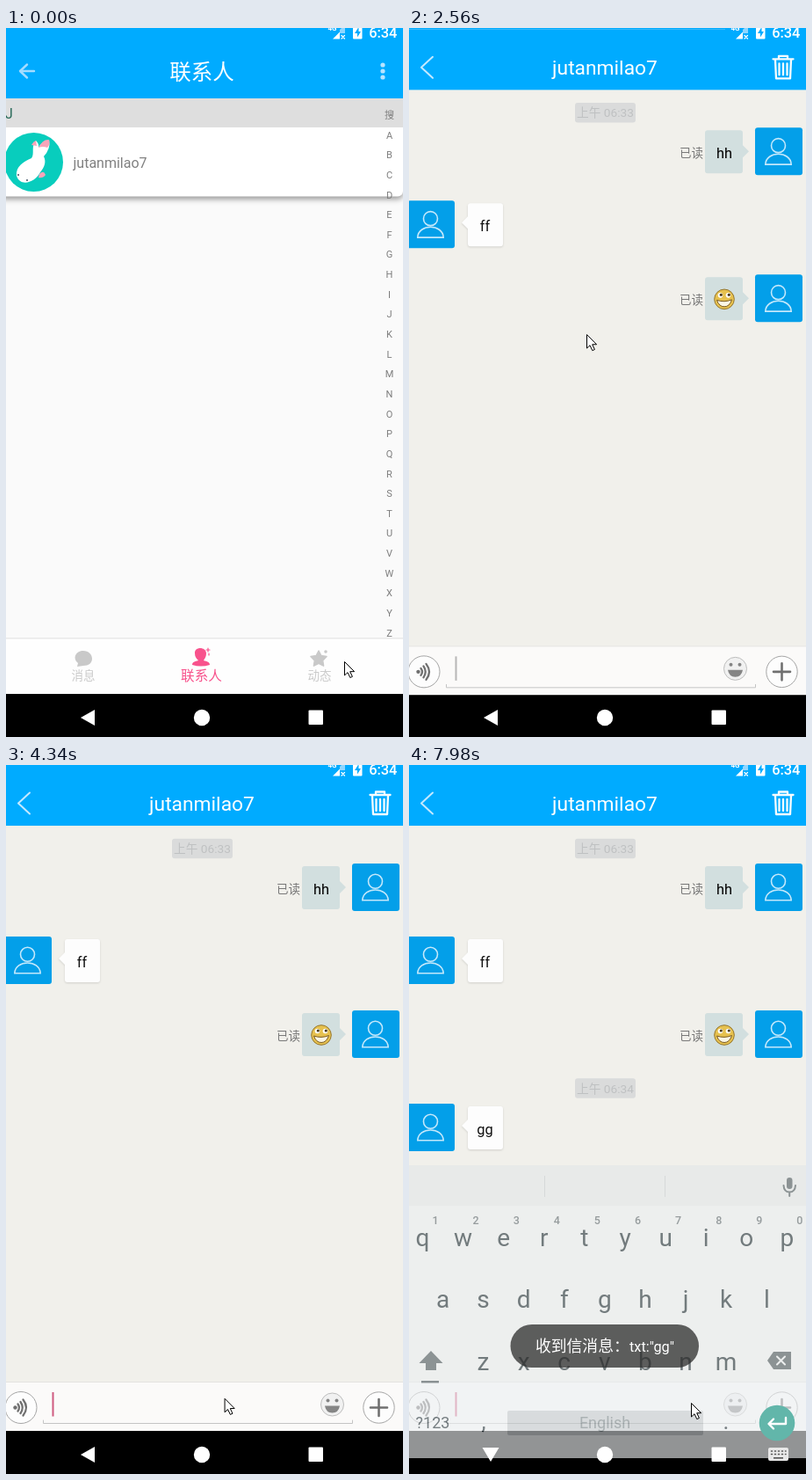
Write an HTML page that moves like this. It is 452 px wide and 806 px high and loops after 8 s.

```html
<!DOCTYPE html>
<html lang="zh">
<head>
<meta charset="utf-8">
<title>Chat demo</title>
<style>
  html, body { margin: 0; width: 100%; height: 100%; overflow: hidden; background: #000; }
  svg { display: block; font-family: Roboto, "Noto Sans CJK SC", "Noto Sans CJK", sans-serif; }
  .card { filter: drop-shadow(0 3px 3px #0006); }
  .bubble { filter: drop-shadow(0 1px 1px #0002); }
  .line { fill: none; stroke-linecap: round; stroke-linejoin: round; }
</style>
</head>
<body>
<svg id="stage" width="452" height="806" viewBox="0 0 452 806"></svg>
<script>
const NAME = 'jutanmilao7';
const BLUE = '#00abff';
const PINK = '#f8528c';

// Markup helpers
const rect = (x, y, w, h, fill, rx = 0, more = '') =>
  `<rect x="${x}" y="${y}" width="${w}" height="${h}" fill="${fill}" rx="${rx}" ${more}/>`;
const circle = (x, y, r, fill, more = '') =>
  `<circle cx="${x}" cy="${y}" r="${r}" fill="${fill}" ${more}/>`;
const shape = (d, fill, more = '') => `<path d="${d}" fill="${fill}" ${more}/>`;
const line = (d, stroke, width = 2, more = '') =>
  `<path class="line" d="${d}" stroke="${stroke}" stroke-width="${width}" ${more}/>`;
const text = (x, y, str, size, fill, anchor = 'middle', weight = 400) =>
  `<text x="${x}" y="${y}" font-size="${size}" fill="${fill}" text-anchor="${anchor}" font-weight="${weight}">${str}</text>`;
const group = (id, ...parts) => `<g id="${id}">${parts.join('')}</g>`;

function star(cx, cy, r) {
  const points = Array.from({ length: 10 }, (_, i) => {
    const a = i * Math.PI / 5 - Math.PI / 2, k = i % 2 ? r * 0.52 : r;
    return [cx + k * Math.cos(a), cy + k * Math.sin(a)];
  });
  return `<polygon points="${points}" fill="#c9c9c9" stroke="#c9c9c9" stroke-width="1.5" stroke-linejoin="round"/>`;
}

// Contacts page
const fish = circle(31.5, 152.5, 33.5, '#08cdbd')
  + shape('M12 168C11 157 20 152 29 148C33 143 28 135 34 128Q38 132 37 136Q42 127 49 128Q51 137 43 146C46 152 44 158 39 164C33 176 16 181 12 168Z', '#fff')
  + shape('M37 136Q42 126 49 127Q51 132 47 136Q42 134 37 136ZM38 166Q43 161 45 167Q42 171 37 170ZM29 133Q31 129 34 128L35 134Z', '#f8a5ba')
  + circle(14, 167, 1, '#456') + circle(24, 173, 1, '#456');

const index = [...'搜ABCDEFGHIJKLMNOPQRSTUVWXYZ']
  .map((c, i) => text(436.5, 103 + i * 22.64, c, 11, '#7c7c7c')).join('');

const contacts = group('contacts',
  rect(0, 0, 452, 757, '#fafafa'),
  rect(-8, 100, 460, 91.5, '#fff', 6, 'class="card"'),
  rect(0, 80, 452, 33, '#dedede'),
  rect(0, 0, 452, 80, BLUE),
  line('M32 49H17M24 41.5L16 49L24 56.5', '#a4dcff', 2.4),
  [42, 49, 56].map(y => circle(429, y, 2.6, '#b9e4ff')).join(''),
  text(223, 58.5, '联系人', 24.5, '#fff'),
  text(-1, 103, 'J', 16, '#2a6b5a', 'start'),
  fish,
  text(76.5, 158.5, NAME, 16, '#808080', 'start'),
  index,
  rect(0, 693, 452, 64, '#e9e9e9'),
  rect(0, 694.5, 452, 62.5, '#fefefe'),
  shape('M88 708C94 708 98 712 98 717C98 722 94 725 88 725L81 726L82 722C75 716 80 708 88 708Z', '#c9c9c9'),
  text(88, 740.5, '消息', 13.5, '#cacaca'),
  shape('M215 711C214 703 228 703 228 711C228 715 226 717 225 719C229 720 232 721 232 724Q222 727 212 724C212 721 215 720 219 719C217 717 215 715 215 711Z', PINK),
  line('M230 705V709M228 707H232M231 711V713', PINK, 1.2),
  text(222.5, 741.5, '联系人', 15.6, PINK),
  star(356, 717.5, 9.5), circle(364, 709, 1.8, '#c9c9c9'),
  text(357, 740.5, '动态', 13.5, '#cacaca'),
  rect(0, 757, 452, 49, '#000'));

// Chat page
const avatar = (x, y) => rect(x, y, 54, 54, '#039fe9', 3)
  + `<g transform="translate(${x + 26.5} ${y})" stroke="#c4e8fb" stroke-width="1.6" fill="none">`
  + '<circle cy="20.3" r="8"/><path d="M-14.7 41.8C-14 26 14 26 14.7 41.8Z"/></g>';
const stamp = (y, str) => rect(189, y, 69, 22.5, '#dadbdb', 3)
  + text(223.5, y + 16.3, str, 13.7, '#bfc1c2');
const sent = (y, content) => avatar(394, y)
  + shape(`M340 ${y + 3}H377Q380 ${y + 3} 380 ${y + 6}V${y + 20}L387 ${y + 27}L380 ${y + 34}V${y + 49}Q380 ${y + 52} 377 ${y + 52}H340Q337 ${y + 52} 337 ${y + 49}V${y + 6}Q337 ${y + 3} 340 ${y + 3}Z`, '#d2dfdf')
  + text(321.5, y + 34, '已读', 13.5, '#777') + content;
const received = (y, str) => avatar(-2, y)
  + shape(`M70 ${y + 3}H104Q107 ${y + 3} 107 ${y + 6}V${y + 49}Q107 ${y + 52} 104 ${y + 52}H70Q67 ${y + 52} 67 ${y + 49}V${y + 32}L60 ${y + 25}L67 ${y + 18}V${y + 6}Q67 ${y + 3} 70 ${y + 3}Z`, '#fdfdfd', 'class="bubble"')
  + text(86.5, y + 34.5, str, 16.4, '#111');

const grin = circle(359, 307, 11.3, '#e6c14f', 'stroke="#947630"')
  + [354.5, 363.5].map(x => circle(x, 302.5, 2.8, '#fff') + circle(x + 0.8, 302, 1.6, '#4a3a1c')).join('')
  + shape('M350.5 308Q359 311 367.5 307.5Q365 315.5 359 315.5Q353 315.5 350.5 308Z', '#fbf6e4', 'stroke="#7a5a20"');

const inputBar = rect(0, 701, 452, 56, '#fbfaf9')
  + rect(0, 701, 452, 1, '#e4e3e0')
  + line('M42.5 745V748.5H394.5V745', '#c4c4c4', 1)
  + circle(17, 730.5, 18, '#fdfdfd', 'stroke="#a5a5a5"')
  + circle(10.5, 730.5, 2.2, '#707070')
  + line('M13.5 726.5Q16.5 730.5 13.5 734.5M16.5 724Q21 730.5 16.5 737M19.5 721.5Q26.5 730.5 19.5 739.5', '#707070', 2.3)
  + circle(371.5, 727, 13, '#f1f1f1', 'stroke="#bdbdbd"')
  + circle(366.5, 722.5, 2, '#858585') + circle(376.5, 722.5, 2, '#858585')
  + shape('M363 728.5H380Q378.5 736.5 371.5 736.5Q364.5 736.5 363 728.5Z', '#858585')
  + circle(424.5, 730.5, 17.7, '#fdfdfd', 'stroke="#a5a5a5"')
  + line('M415 730.5H434M424.5 721V740', '#707070', 2.6)
  + rect(52.5, 713, 2, 27.5, '#cf5a80', 0, 'id="caret"');

const chat = group('chat',
  rect(0, 0, 452, 757, '#f1f0eb'),
  rect(0, 0, 452, 69, BLUE),
  line('M27 31.5L14 43.5L27 55.5', '#c3e9ff'),
  line('M414.5 34H437.5M421 33V30.5H431V33M417 35L418 56H434L435 35M421.5 39V52M426 39V52M430.5 39V52', '#f6fcff', 2.3),
  text(223, 52, NAME, 22.8, '#fff'),
  stamp(83.7, '上午 06:33'),
  sent(112, text(359, 147, 'hh', 16.4, '#000')),
  received(195, 'ff'),
  sent(279, grin),
  group('incoming', stamp(356.3, '上午 06:34'), received(385, 'gg')),
  inputBar,
  rect(0, 757, 452, 49, '#000'));

// Keyboard
const KEY = '#26343a';
const keyRow = (letters, x, y) =>
  [...letters].map((c, i) => text(x + i * 46.1, y, c, 28, KEY)).join('');
const keyboard = group('keyboard',
  rect(0, 455, 452, 333, '#eceff1'),
  rect(0, 455, 452, 46, '#e3e7e9'),
  rect(154, 467, 1, 24, '#c6cccf'), rect(291, 467, 1, 24, '#c6cccf'),
  rect(430, 469, 6.5, 13, '#4f5b60', 3.2),
  line('M426.5 478Q427 485.5 433.2 485.5Q439.5 485.5 440 478M433.2 486V490', '#4f5b60'),
  [...'1234567890'].map((c, i) => text(30 + i * 46.1, 521.5, c, 12.5, '#5f6a6f', 'middle', 500)).join(''),
  keyRow('qwertyuiop', 15.5, 546.5),
  keyRow('asdfghjkl', 38.5, 616.5),
  keyRow('zxcvbnm', 84.5, 687.5),
  shape('M25 666L38.5 680H31V688H19V680H11.5Z', '#4f5b60'),
  rect(14, 700, 20, 2.5, '#4f5b60'),
  shape('M408 677L415 667H435V687H415Z', '#4f5b60'),
  line('M419 672.5L428 681.5M428 672.5L419 681.5', '#eceff1'),
  text(27, 754, '?123', 18, KEY),
  text(85, 755, ',', 26, KEY), text(361, 755, '.', 26, KEY),
  rect(112, 734, 223, 28, '#c3c9cc', 2),
  text(223, 753.5, 'English', 18, '#7a8589'));
const enterKey = group('enter',
  circle(419, 748, 20.3, '#62b6aa'),
  line('M429 742V749H410M415 743.5L409.5 749L415 754.5', '#fff', 2.4));

// System bars, toast and pointer
const navIcons = shape('M85 784L101 775V793Z', '#fff', 'id="back"')
  + group('imeIcons',
    shape('M83.5 776H102.5L93 792Z', '#fff'),
    rect(409, 776, 23, 15, '#e8e8e8', 2),
    line('M412.5 780H429M412.5 783.5H429', '#555', 1.5, 'stroke-dasharray="1 3"'),
    rect(415, 787, 11, 1.6, '#555'))
  + circle(223, 784, 9.2, '#fff') + rect(344.5, 775.5, 16.5, 16.5, '#fff', 1);

const statusBar = rect(360, 0, 92, 14, BLUE)
  + shape('M372 12.5L386 -1.5V6H380V12.5Z', '#fff')
  + shape('M386 -4V6H380V2Z', '#8fd6ff')
  + line('M382 8.5L385.5 12M385.5 8.5L382 12', '#fff', 1.3)
  + text(371.5, 3.3, '4G', 8, '#fff', 'middle', 700)
  + rect(395, -3, 10.5, 15.5, '#fff', 1)
  + shape('M401.5 -1L397 6H400V10.5L404 4H401.5Z', BLUE)
  + text(429.3, 10.6, '6:34', 16.4, '#fff', 'middle', 500);

const toast = group('toast',
  rect(115.5, 636, 214.5, 49, '#2b2b2b', 24.5, 'fill-opacity=".74"'),
  text(144, 667, '收到信消息：', 17.8, '#fff', 'start'),
  text(251, 667, 'txt:"gg"', 16.3, '#fff', 'start'));

const pointer = group('pointer',
  shape('M.5 .5V16L4 12.7L6.8 18.6L9.4 17.4L6.7 11.7H11.6Z', '#fff', 'stroke="#000"'));

const stage = document.getElementById('stage');
stage.innerHTML = contacts + chat + keyboard + enterKey + navIcons + toast + statusBar + pointer;

const el = id => document.getElementById(id);
const set = (id, name, value) => el(id).setAttribute(name, value);
const progress = (t, start, length) => Math.max(0, Math.min(1, (t - start) / length));

// Pointer path: time, x, y
const PATH = [
  [0, 385, 720], [70, 386, 715], [520, 430, 112], [770, 430, 112], [1150, 428, 60],
  [1530, 205, 260], [1610, 205, 260], [2000, 216, 149], [2390, 216, 149],
  [2560, 202, 348], [3090, 203, 379], [3330, 203, 379], [4090, 247, 690],
  [4410, 249, 728], [6000, 249, 728], [6600, 260, 742], [6900, 277, 765],
  [6990, 312, 762], [7070, 326, 741], [7370, 321, 725], [8000, 321, 725]
];
function pointerAt(t) {
  const i = PATH.findIndex(p => p[0] > t);
  const [t0, x0, y0] = PATH[i - 1], [t1, x1, y1] = PATH[i];
  const k = (t - t0) / (t1 - t0);
  return [x0 + (x1 - x0) * k, y0 + (y1 - y0) * k];
}

function draw(t) {
  const open = progress(t, 2375, 350);
  set('chat', 'transform', `translate(0 ${60 * (1 - open) ** 5})`);
  set('chat', 'opacity', 1 - (1 - progress(t, 2375, 200)) ** 4);

  const caretOff = (t > 2900 && t < 3600) || (t > 6400 && t < 6900);
  set('caret', 'opacity', caretOff ? 0 : t < 2900 ? 0.5 : 1);
  set('caret', 'fill', t < 2900 || (t > 6900 && t < 7800) ? '#777' : '#cf5a80');

  set('incoming', 'opacity', t >= 6810 ? 1 : 0);
  set('toast', 'opacity', 1 - (1 - progress(t, 6810, 500)) ** 2);

  const rise = progress(t, 7880, 100);
  const slide = `translate(0 ${18 * (1 - rise)})`;
  set('keyboard', 'opacity', 0.62 * rise);
  set('keyboard', 'transform', slide);
  set('enter', 'opacity', rise);
  set('enter', 'transform', slide);
  set('imeIcons', 'opacity', rise > 0 ? 1 : 0);
  set('back', 'opacity', rise > 0 ? 0 : 1);

  set('pointer', 'transform', `translate(${pointerAt(t)})`);
}

const begin = performance.now();
function tick() {
  draw((performance.now() - begin) % 8000);
  requestAnimationFrame(tick);
}
tick();
</script>
</body>
</html>
```
